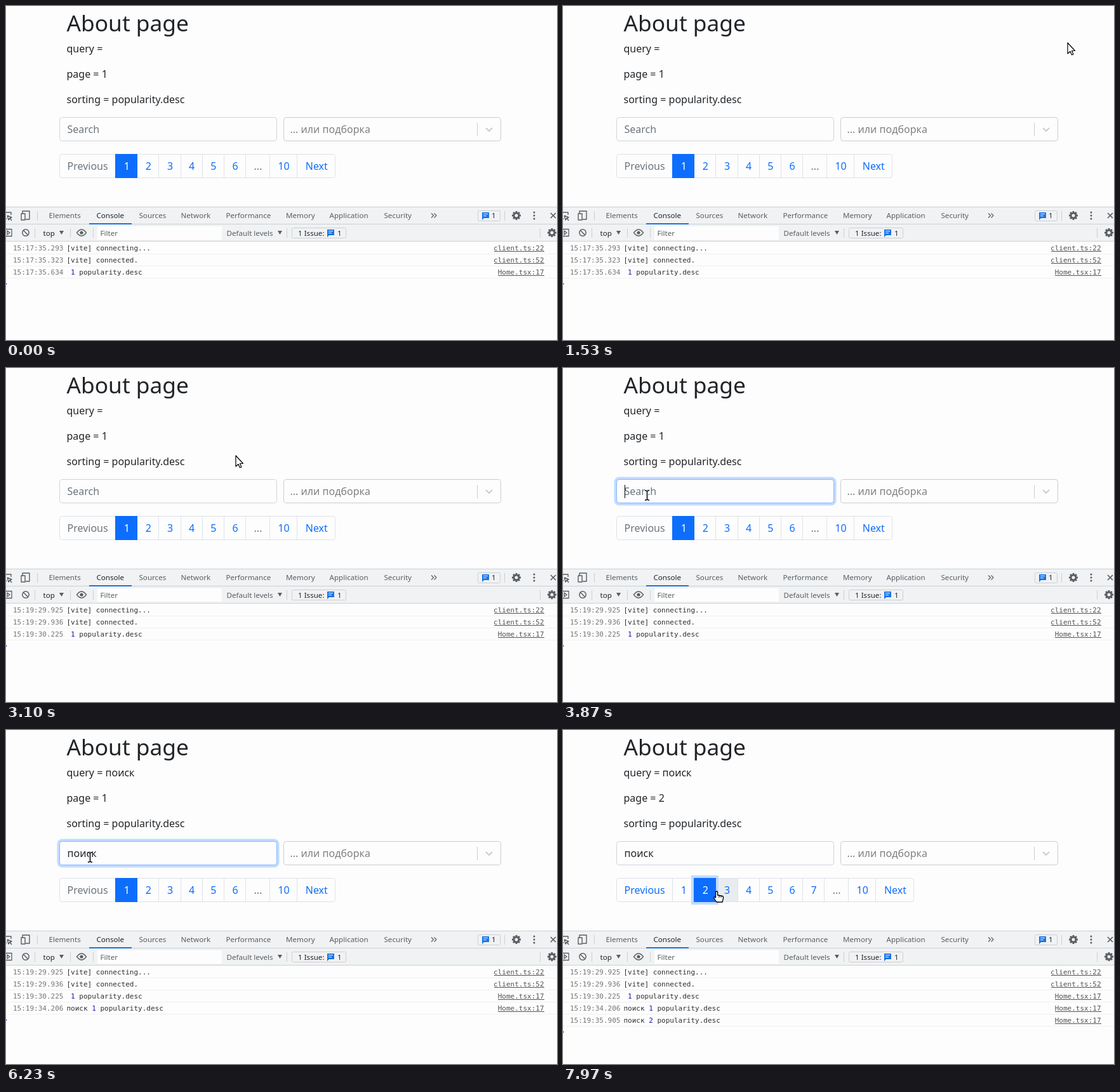
Recreate the animation shown at these times as an HTML page with a canvas. Size 868 px wide and 526 px high, loop 8000 ms.

```html
<!DOCTYPE html>
<html lang="en">
<head>
<meta charset="utf-8">
<title>About page</title>
<style>
html, body { margin: 0; width: 100%; height: 100%; overflow: hidden; background: #fdfdfd; }
canvas { display: block; }
</style>
</head>
<body>
<canvas id="stage" width="868" height="526"></canvas>
<script>
const ctx = document.getElementById('stage').getContext('2d');
const LOOP = 8000;
const SANS = '"Noto Sans", sans-serif';
const MONO = '11px "DejaVu Sans Mono", monospace';
const BODY = `16px ${SANS}`, UI = `11.6px ${SANS}`;
const C = {
  page: '#fdfdfd', bar: '#f0f2f3', border: '#ced4da', line: '#cdd0d4', cell: '#dee2e6', faint: '#f0f0f0',
  ink: '#212529', gray: '#6c757d', ui: '#5a5e63', accent: '#1a73e8', link: '#0d6efd', ring: '#c2dbfe',
  hover: '#e9ecef', number: '#1a1aa6'
};

const FOCUS = 3650, RELOAD = 1740, SEARCHED = 6061, PAGED = 7740, BLUR = 7680;
const KEYS = [4930, 5070, 5220, 5400, 5560];
const QUERY = 'поиск';
const OLD_TIMES = ['15:17:35.293', '15:17:35.323', '15:17:35.634'];
const LOGS = [
  [1780, '15:19:29.925', '[vite] connecting...', 'client.ts:22'],
  [1791, '15:19:29.936', '[vite] connected.', 'client.ts:52'],
  [2080, '15:19:30.225', ' 1 popularity.desc', 'Home.tsx:17'],
  [SEARCHED, '15:19:34.206', 'поиск 1 popularity.desc', 'Home.tsx:17'],
  [PAGED, '15:19:35.905', 'поиск 2 popularity.desc', 'Home.tsx:17']
];
// Pointer stops: time, x, y
const PATH = [
  [1050, 880, 8], [1450, 795, 58], [2680, 795, 58], [3330, 190, 170], [3560, 131.5, 200],
  [6250, 131.5, 200], [6850, 321, 250], [7120, 321, 250], [7520, 241.5, 254], [8000, 241.5, 254]
];

function text(str, x, y, font = BODY, color = C.ink, align = 'left') {
  ctx.font = font;
  ctx.fillStyle = color;
  ctx.textAlign = align;
  ctx.fillText(str, x, y);
}

function textWidth(str, font) {
  ctx.font = font;
  return ctx.measureText(str).width;
}

function fill(x, y, w, h, color) {
  ctx.fillStyle = color;
  ctx.fillRect(x, y, w, h);
}

function box(x, y, w, h, r, stroke, background) {
  ctx.beginPath();
  ctx.roundRect(x + .5, y + .5, w - 1, h - 1, r);
  if (background) { ctx.fillStyle = background; ctx.fill(); }
  ctx.strokeStyle = stroke;
  ctx.lineWidth = 1;
  ctx.stroke();
}

// Draws an SVG path moved to x, y
function shape(d, x, y, stroke, width = 1, background) {
  const path = new Path2D(d);
  ctx.save();
  ctx.translate(x, y);
  if (background) { ctx.fillStyle = background; ctx.fill(path); }
  if (stroke) {
    ctx.strokeStyle = stroke;
    ctx.lineWidth = width;
    ctx.lineJoin = 'round';
    ctx.stroke(path);
  }
  ctx.restore();
}

function circle(x, y, r, color, width) {
  ctx.beginPath();
  ctx.arc(x, y, r, 0, 7);
  if (width) { ctx.strokeStyle = color; ctx.lineWidth = width; ctx.stroke(); }
  else { ctx.fillStyle = color; ctx.fill(); }
}

function gear(x, y) {
  for (let i = 0; i < 8; i++) {
    ctx.save();
    ctx.translate(x, y);
    ctx.rotate(i * Math.PI / 4);
    fill(-1.5, -7, 3, 3, C.ui);
    ctx.restore();
  }
  circle(x, y, 3.9, C.ui, 2.8);
}

function message(x, y) {
  shape('M0 0H11V9H3L0 12Z', x, y, null, 0, C.accent);
  fill(x + 2, y + 2, 7, 1, C.page);
  fill(x + 2, y + 5, 5, 1, C.page);
}

const arrowDown = (x, y) => shape('M0 0H7L3.5 6Z', x, y, null, 0, C.ui);

function pointerAt(t) {
  if (t < PATH[0][0]) return null;
  const i = PATH.findIndex(p => p[0] > t);
  const [t0, x0, y0] = PATH[i - 1], [t1, x1, y1] = PATH[i];
  const u = (t - t0) / (t1 - t0), e = u * u * (3 - 2 * u);
  return { x: x0 + (x1 - x0) * e, y: y0 + (y1 - y0) * e };
}

const inside = (p, x, y, w, h) => p && p.x >= x && p.x < x + w && p.y >= y && p.y < y + h;

function drawPointer(p, overLink) {
  if (!p) return;
  const x = Math.round(p.x), y = Math.round(p.y);
  if (overLink) {
    shape('M-1.5 1Q0-1 1.5 1V6L9 7.5Q11 8 10.5 11L9 17H0L-4.5 10.5Q-4 8-1.5 10Z', x, y, '#000', 1.3, '#fff');
    shape('M4 7V10M7 7.5V10', x, y, '#000', 1);
  } else if (inside(p, 84, 175, 343, 38)) {
    const beam = 'M-3-7H-1L.5-6L2-7H4M.5-6V7M-3 8H-1L.5 7L2 8H4';
    shape(beam, x, y, '#fff', 3.5);
    shape(beam, x, y, '#000', 1.5);
  } else {
    shape('M0 0V17L4 13.5L6.5 19L9 18L6.5 12.5H11.5Z', x, y, '#000', 1.2, '#fff');
  }
}

function drawPage(t) {
  const pageNo = t >= PAGED ? 2 : 1;
  text('About page', 95.5, 40, `35.3px ${SANS}`);
  text('query = ' + (t >= SEARCHED ? QUERY : ''), 95.5, 73);
  text('page = ' + pageNo, 95.5, 113);
  text('sorting = popularity.desc', 95.5, 153);

  const focused = t >= FOCUS && t < BLUR;
  if (focused) {
    ctx.beginPath();
    ctx.roundRect(80.5, 171.5, 350, 45, 8);
    ctx.fillStyle = C.ring;
    ctx.fill();
  }
  box(84, 175, 343, 38, 4, focused ? '#86b7fe' : C.border, C.page);
  const typed = QUERY.slice(0, KEYS.filter(k => k <= t).length);
  text(typed || 'Search', 96.5, 200, BODY, typed ? C.ink : C.gray);
  const lastInput = Math.max(FOCUS, ...KEYS.filter(k => k <= t));
  if (focused && (t - lastInput) % 1000 < 500) {
    fill(Math.round(96.5 + textWidth(typed, BODY)), 184, 1, 21, '#000');
  }

  box(437, 175, 343, 38, 4, '#ccc', C.page);
  text('... или подборка', 447.5, 200, BODY, '#808080');
  fill(742, 184, 1, 21, '#ccc');
  shape('M-5-2.5L0 2.5L5-2.5', 761, 194.5, '#ccc', 2);
}

// Returns whether the pointer rests on a link
function drawPagination(t, pointer) {
  const current = t >= PAGED ? 2 : 1;
  const labels = ['Previous', ...Array.from({ length: current + 5 }, (_, i) => String(i + 1)), '...', '10', 'Next'];
  const widths = labels.map(label => textWidth(label, BODY) + 25);
  const total = widths.reduce((sum, w) => sum + w, 0);
  let x = 83.5, overLink = false, selected;
  box(84, 233, Math.floor(total), 38, 4, C.cell, C.page);
  labels.forEach((label, i) => {
    const left = Math.floor(x), wide = Math.floor(x + widths[i]) - left + 1;
    const enabled = label !== '...' && !(label === 'Previous' && current === 1);
    const over = enabled && inside(pointer, left, 233, wide, 38) && !overLink;
    overLink = overLink || over;
    if (label === String(current)) {
      selected = { label, left, wide, textX: x + 13 };
    } else {
      if (over) fill(left + 1, 234, wide - 2, 36, C.hover);
      if (i) fill(left, 233, 1, 38, C.cell);
      text(label, x + 13, 258, BODY, enabled ? C.link : C.gray);
    }
    x += widths[i];
  });
  if (t >= BLUR && current === 2) fill(selected.left - 4, 229, selected.wide + 8, 46, C.ring);
  fill(selected.left, 233, selected.wide, 38, C.link);
  text(selected.label, selected.textX, 258, BODY, '#fff');
  return overLink;
}

function drawToolbars() {
  fill(0, 316, 868, 55, C.bar);
  for (const y of [316, 343, 370]) fill(0, y, 868, 1, C.line);

  shape('M-2-5H8V-1M8-5V-2M-2 5H1M2 0L9 3L6 4L9 8M2 0L4 7L6 4', 0, 330, C.ui, 1.4);
  shape('M26 327V323H37V336H31M24 327H30V337H24Z', 0, 0, C.ui, 1.4);
  const tabs = { Elements: 67.5, Console: 142.5, Sources: 209.5, Network: 275.5, Performance: 346.5,
    Memory: 441, Application: 509.5, Security: 595.5 };
  for (const [name, x] of Object.entries(tabs)) text(name, x, 334, UI, name === 'Console' ? C.ink : C.ui);
  fill(131, 342, 67, 2, C.accent);
  shape('M0 0L3.5 3.5L0 7M4.5 0L8 3.5L4.5 7', 670, 326.5, C.ui, 1.2);
  box(743, 322, 36, 17, 2, C.line);
  message(750, 325);
  text('1', 765, 334, UI);
  gear(804, 330);
  for (const y of [325, 330, 335]) circle(832, y, 1.5, C.ui);
  shape('M-4-4L4 4M4-4L-4 4', 862, 330, C.ui, 1.7);
  for (const x of [49, 785]) fill(x, 323, 1, 15, C.line);

  shape('M-2-5.5H9V5.5H-2M2-3V3L6 0Z', 0, 357, C.ui, 1.3);
  circle(31, 357, 5.2, C.ui, 1.5);
  shape('M-3.7-3.7L3.7 3.7', 31, 357, C.ui, 1.5);
  text('top', 58.5, 362, UI);
  arrowDown(84, 354);
  shape('M-7.5 0Q0-10 7.5 0Q0 10-7.5 0Z', 119, 357, C.ui, 1.4);
  circle(119, 357, 2.6, C.ui);
  fill(144, 347, 196, 21, C.page);
  text('Filter', 148.5, 362, UI, C.ui);
  text('Default levels', 347.5, 362, UI, C.ui);
  arrowDown(428, 354);
  box(450, 349, 86, 17, 2, C.line);
  text('1 Issue:', 460, 362, UI);
  message(506, 352);
  text('1', 522, 362, UI);
  for (const x of [45, 101, 137, 442, 841]) fill(x, 350, 1, 15, C.line);
  gear(860, 357);
}

// Writes a console message with its numbers coloured
function logMessage(str, x, y) {
  for (const part of str.split(/(\d)/)) {
    text(part, x, y, MONO, /\d/.test(part) ? C.number : '#303030');
    x += textWidth(part, MONO);
  }
}

function drawConsole(t) {
  const rows = t < RELOAD
    ? LOGS.slice(0, 3).map((row, i) => [0, OLD_TIMES[i], row[2], row[3]])
    : LOGS.filter(row => row[0] <= t);
  rows.forEach(([, time, body, source], i) => {
    const y = 385 + i * 19;
    text(time, 11, y, MONO, '#757575');
    logMessage(body, 95.5, y);
    text(source, 847.5, y, MONO, '#545454', 'right');
    const w = Math.round(textWidth(source, MONO));
    fill(848 - w, y + 1, w, 1, '#545454');
    fill(0, y + 5, 868, 1, C.faint);
  });
  shape('M-3-3L1 0L-3 3', 0, 380.5 + rows.length * 19, '#367cf1', 1.4);
}

function draw(now) {
  const t = now % LOOP;
  const pointer = pointerAt(t);
  fill(0, 0, 868, 526, C.page);
  drawPage(t);
  const overLink = drawPagination(t, pointer);
  drawToolbars();
  drawConsole(t);
  drawPointer(pointer, overLink);
}

const start = performance.now();
function frame() {
  draw(performance.now() - start);
  requestAnimationFrame(frame);
}
frame();
</script>
</body>
</html>
```
